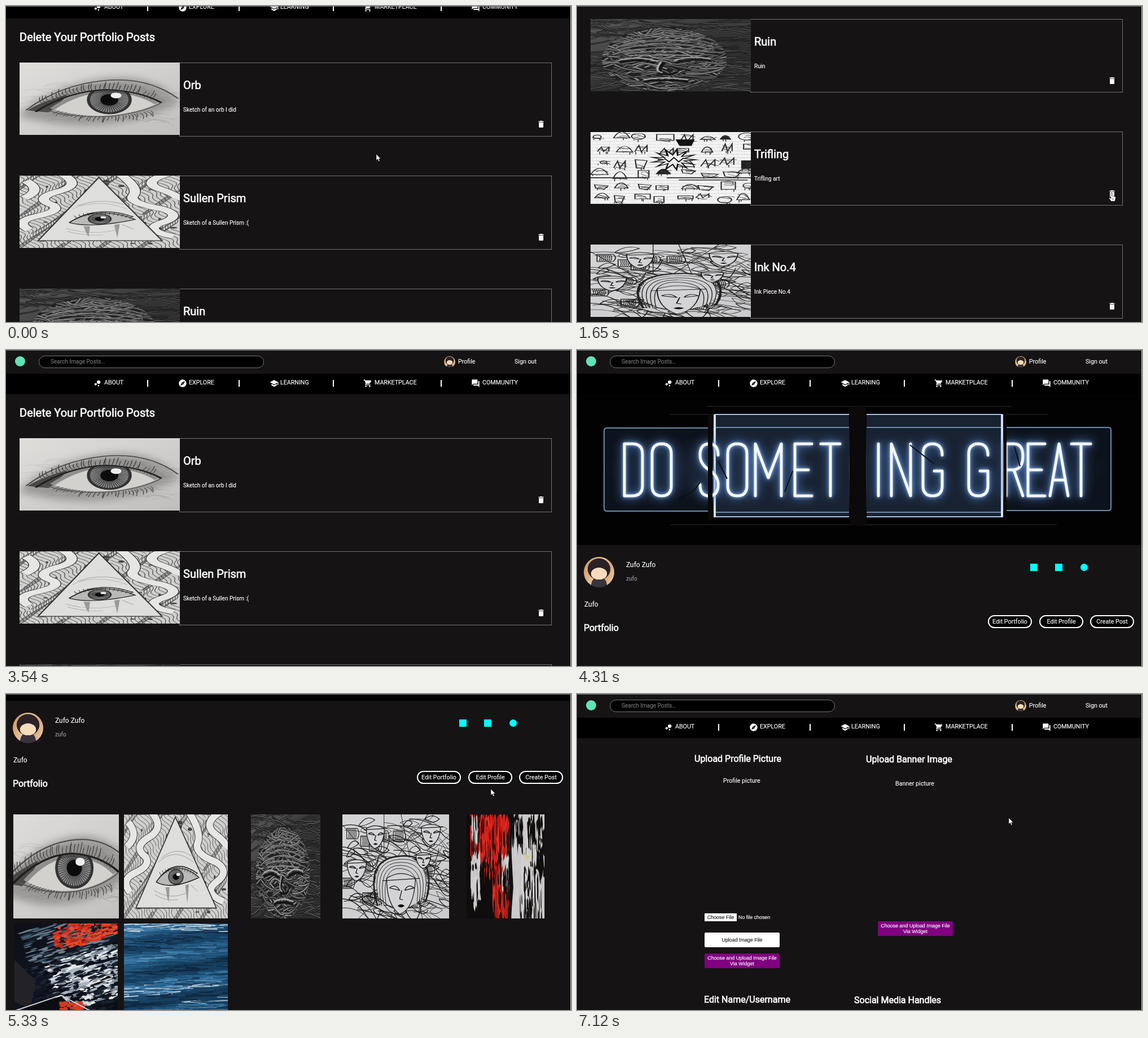
These frames come from a looping animation (1001x559 px, 8 s). An HTML page with a canvas:

```html
<!DOCTYPE html>
<html lang="en">
<head>
<meta charset="utf-8">
<title>Portfolio</title>
<style>
html, body { margin: 0; width: 100%; height: 100%; overflow: hidden; background: #151314; }
body { position: relative; font: 10.67px/20px Roboto, sans-serif; color: #fff; -webkit-text-stroke: .15px; }
body *, #frame { position: absolute; white-space: nowrap; }
svg { overflow: visible; }
svg * { position: static; }
#page, section { left: 0; top: 0; width: 1001px; height: 1400px; }
#page, section, #rest, #wall, #hero, #bio, #gallery, #cursor, #arrow, #hand {
  animation: 8s step-end -1ms infinite;
}
#frame { inset: 0; box-sizing: border-box; border: solid #777; border-width: 1px 1px 0 0; border-right-color: #ccc; }

#nav { top: 42px; width: 1001px; height: 36px; background: #000; }
#nav svg { top: 9px; width: 16px; height: 16px; fill: #fff; }
#nav span { top: 6px; }
#nav i { top: 11px; width: 2px; height: 12px; background: #fff; }
#search { left: 58px; top: 10px; width: 377px; height: 20px; padding-left: 20px; border: 1px solid #777;
  border-radius: 11px; background: #000; color: #757575; font-size: 10px; }
.dot { border-radius: 50%; }
.face { border-radius: 50%; background:
  radial-gradient(27% 20% at 50% 55%, #f6dcbb 96%, transparent),
  radial-gradient(38% 36% at 50% 40%, #2b2226 96%, transparent),
  radial-gradient(26% 28% at 50% 92%, #38343c 96%, transparent),
  linear-gradient(115deg, #c98f5d, #e9c49c 45%, #d9a77a 70%, #f0d6b8); }

h1, h2 { margin: 0; font-weight: 400; -webkit-text-stroke: .65px #fff; }
h1 { font-size: 20px; }
h2 { font-size: 16px; }

.card { left: 24px; width: 943px; height: 130.67px; }
.card div { left: 283px; width: 660px; height: 130.67px; box-sizing: border-box; border: 1px solid #747474; }
.card canvas { width: 284px; height: 128px; }
.card h1 { left: 290px; top: 30px; }
.card p { left: 290px; top: 74px; margin: 0; font-size: 10px; }
.card svg { left: 916px; top: 101px; width: 16px; height: 16px; fill: #fff; }

.pill { top: 469px; width: 74px; height: 19px; border: 2px solid #fff; border-radius: 12px; background: #000; text-align: center; }
.sns { top: 378px; width: 13px; height: 13px; background: #0ff; }
#bio span { font-size: 12px; }

.btn, .file { font: 8.89px/10px "Liberation Sans", Arial, sans-serif; text-align: center; }
.btn { width: 133px; border-radius: 2px; padding: 3px 0; height: 20px; background: #800080; }
.plain { background: #fff; color: #222; line-height: 20px; }

@keyframes scroll {
  0% { top: -56px } 1.5% { top: -190px } 3% { top: -332.67px } 6.125% { top: -360px }
  7.875% { top: -440px } 9.375% { top: -510px } 10.875% { top: -532.67px }
  36.75% { top: -480px } 38.25% { top: -350px } 39.75% { top: -210px } 41.25% { top: -100px } 42.75% { top: -30px }
  44.25% { top: 0 } 60.625% { top: -16px } 62.125% { top: -80px } 63.625% { top: -170px }
  65.125% { top: -270px } 66.625% { top: -333px }
  82.625% { top: -250px } 84.125% { top: -150px } 85.625% { top: -70px } 87.5% { top: -20px }
  89%, 100% { top: 0 }
}
@keyframes point {
  0% { transform: translate(656px, 262px) } 6.125% { transform: translate(667px, 268px) }
  10.875% { transform: translate(681px, 275px) } 12.75% { transform: translate(824px, 313px) }
  14.5% { transform: translate(880px, 322px) } 16% { transform: translate(925px, 330px) }
  17.5% { transform: translate(949px, 333px) } 19.125% { transform: translate(948px, 332px) }
  20.625% { transform: translate(947px, 330px) } 33.75% { transform: translate(800px, 310px) }
  35.25% { transform: translate(598px, 282px) } 42.75% { transform: translate(620px, 90px) }
  44.25% { transform: translate(640px, -40px) } 55.625% { transform: translate(790px, 70px) }
  57.125% { transform: translate(806px, 210px) } 58.75% { transform: translate(813px, 368px) }
  65.125% { transform: translate(845px, 230px) } 66.625% { transform: translate(859px, 168px) }
  68.125% { transform: translate(859px, 148px) } 79.5% { transform: translate(810px, 190px) }
  85.625%, 100% { transform: translate(765px, 219px) }
}
@keyframes arrow { 0%, 33.75%, 65.125%, 73.5% { opacity: 1 } 17.5%, 58.75%, 71.625% { opacity: 0 } 100% { opacity: 1 } }
@keyframes hand { 0%, 33.75%, 65.125%, 73.5% { opacity: 0 } 17.5%, 58.75%, 71.625% { opacity: 1 } 100% { opacity: 0 } }
@keyframes posts { 0% { opacity: 1 } 52.375%, 100% { opacity: 0 } }
@keyframes profile { 0% { opacity: 0 } 52.375% { opacity: 1 } 73.5%, 100% { opacity: 0 } }
@keyframes edit { 0% { opacity: 0 } 73.5%, 100% { opacity: 1 } }
@keyframes load { 0% { opacity: 0 } 53.875%, 100% { opacity: 1 } }
@keyframes images { 0% { opacity: 0 } 55.625%, 100% { opacity: 1 } }
@keyframes remove { 0% { opacity: 1 } 30.25%, 100% { opacity: 0 } }
@keyframes closeup { 0% { top: 199.67px } 30.25%, 100% { top: 0 } }
#page { animation-name: scroll }
#posts { animation-name: posts }
#profile { animation-name: profile }
#edit { animation-name: edit }
#hero, #bio { animation-name: load }
#gallery { animation-name: images }
#wall { animation-name: remove }
#rest { animation-name: closeup }
#list, #wall, #rest { top: 0; }
#cursor { animation-name: point }
#arrow { animation-name: arrow }
#hand { animation-name: hand }
</style>
</head>
<body>
<div id="page">
  <b class="dot" style="left:16px;top:11px;width:18px;height:18px;background:#5fe3b5"></b>
  <div id="search">Search Image Posts...</div>
  <b class="face" style="left:776px;top:11px;width:20px;height:20px"></b>
  <span style="left:801px;top:11px">Profile</span>
  <span style="left:901px;top:11px">Sign out</span>
  <div id="nav"></div>

  <section id="posts">
    <h1 style="left:24px;top:101px">Delete Your Portfolio Posts</h1>
    <div id="list"></div>
    <div id="wall"></div>
    <div id="rest"></div>
  </section>

  <section id="profile">
    <svg id="hero" style="left:0;top:78px" width="1001" height="267" viewBox="0 62 1001 267">
      <defs>
        <radialGradient id="haze"><stop stop-color="#2c3f5c"/><stop offset="1" stop-color="#0d131c"/></radialGradient>
      </defs>
      <path d="M0 62H1001V329H0Z" fill="#020203"/>
      <path d="M48 122H946V268H48Z" fill="url(#haze)"/>
      <path d="M244 98H482V280H244ZM513 98H754V280H513Z" fill="#182231"/>
      <path d="M165 98H835M165 293H850M230 84H770M0 122V235" stroke="#1b1817" stroke-width="2"/>
      <path d="M234 122H52Q48 122 48 127V264Q48 269 53 269H234M760 121H942Q946 121 946 126V263Q946 268 941 268H760M244 121H482M244 271H482M513 121H754M513 271H754" fill="none" stroke="#7089ab" stroke-width="2"/>
      <path d="M244 98H482M244 279H482M513 98H754M513 279H754" stroke="#a9bfdc" stroke-width="2"/>
      <path d="M244 98V280M753 98V280" stroke="#cfe0f7" stroke-width="4"/>
      <g id="neon" fill="none" stroke="#f5f9ff" stroke-width="5" stroke-linecap="round" stroke-linejoin="round"
         style="filter:drop-shadow(0 0 3px #8db4ee) drop-shadow(0 0 9px #4f7fc4)"></g>
      <path d="M232 98H240V285H232ZM756 98H761V285H756ZM483 84H512V295H483Z" fill="#0b0909"/>
      <path d="M250 180L266 212M382 198L368 235M590 152L632 185M775 155L785 190M180 245Q200 245 218 218" stroke="#0a0e15" stroke-width="2" fill="none"/>
    </svg>
    <div id="bio">
      <b class="face" style="left:12px;top:366px;width:54px;height:54px"></b>
      <span style="left:87px;top:370px">Zufo Zufo</span>
      <span style="left:87px;top:395px;font-size:10px;color:#999">zufo</span>
      <span style="left:13px;top:440px">Zufo</span>
    </div>
    <b class="sns" style="left:803px"></b><b class="sns" style="left:847px"></b><b class="sns dot" style="left:892px"></b>
    <h2 style="left:12px;top:482px">Portfolio</h2>
    <div class="pill" style="left:728px">Edit Portfolio</div>
    <div class="pill" style="left:819px">Edit Profile</div>
    <div class="pill" style="left:909px">Create Post</div>
    <div id="gallery"></div>
  </section>

  <section id="edit">
    <h2 style="left:208px;top:105px">Upload Profile Picture</h2>
    <h2 style="left:512px;top:106px">Upload Banner Image</h2>
    <span style="left:259px;top:144px">Profile picture</span>
    <span style="left:564px;top:149px">Banner picture</span>
    <span class="file plain" style="left:226px;top:388px;width:57px;line-height:14px">Choose File</span>
    <span class="file" style="left:286px;top:390px">No file chosen</span>
    <div class="btn plain" style="left:226px;top:422px">Upload Image File</div>
    <div class="btn" style="left:226px;top:459px">Choose and Upload Image File<br>Via Widget</div>
    <div class="btn" style="left:533px;top:402px">Choose and Upload Image File<br>Via Widget</div>
    <h2 style="left:225px;top:531px">Edit Name/Username</h2>
    <h2 style="left:491px;top:532px">Social Media Handles</h2>
  </section>
</div>

<div id="cursor" style="left:0;top:0">
  <svg id="arrow" width="9" height="14"><path d="M0 0V11L2.5 8.8 4.3 13 6.2 12.1 4.4 8.2H7.8Z" fill="#fff" stroke="#000" stroke-width=".5"/></svg>
  <svg id="hand" width="13" height="17"><path d="M-1.2 1Q0 -.8 1.2 1V6L6.8 7.3Q7.6 7.7 7.4 9.5L6 15.5H-.8L-4.3 10.2Q-4.6 8.8-3.2 9L-1.2 10.6Z" fill="#fff" stroke="#000" stroke-width=".6"/><path d="M1.2 10V13M3.2 10V13" stroke="#333" stroke-width=".6"/></svg>
</div>
<div id="frame"></div>

<script>
const $ = id => document.getElementById(id);
const svg = d => `<svg viewBox="0 0 24 24"><path d="${d}"/></svg>`;
const ring = (x, y, r) => `M${x - r} ${y}a${r} ${r} 0 1 1 ${2 * r} 0a${r} ${r} 0 1 1 ${-2 * r} 0z`;

// Navigation: icon x, label x, label, icon path
const items = [
  [154, 174, "ABOUT", ring(7.2, 14.4, 3.2) + ring(14.8, 18, 2) + ring(15.2, 8.8, 4.8)],
  [305, 324, "EXPLORE", "M12 10.9c-.61 0-1.1.49-1.1 1.1s.49 1.1 1.1 1.1 1.1-.49 1.1-1.1-.49-1.1-1.1-1.1zM12 2C6.48 2 2 6.48 2 12s4.48 10 10 10 10-4.48 10-10S17.52 2 12 2zm2.19 12.19L6 18l3.81-8.19L18 6z"],
  [467, 486, "LEARNING", "M5 13.18v4L12 21l7-3.82v-4L12 17zM12 3L1 9l11 6 9-4.91V17h2V9z"],
  [633, 653, "MARKETPLACE", ring(7, 20, 2) + ring(17, 20, 2) + "M1 2v2h2l3.6 7.6L5.2 14C4.5 15.4 5.5 17 7 17h12v-2H7.4l1-1.9h7.5c.7 0 1.4-.4 1.7-1L21.2 5.5Q21.5 4 20 4H5.2l-.9-2z"],
  [824, 844, "COMMUNITY", "M21 6h-2v9H6v2c0 .55.45 1 1 1h11l4 4V7c0-.55-.45-1-1-1zm-4 6V3c0-.55-.45-1-1-1H3c-.55 0-1 .45-1 1v14l4-4h10c.55 0 1-.45 1-1z"]
];
$("nav").innerHTML = items.map(([ix, x, label, d]) =>
  svg(d).replace("<svg", `<svg style="left:${ix}px"`) + `<span style="left:${x}px">${label}</span>`).join("") +
  [250, 412, 579, 770].map(x => `<i style="left:${x}px"></i>`).join("");

// Neon sign
const glyphs = {
  D: "M0 0V92H14Q32 92 32 74V18Q32 0 14 0Z", O: "M0 18Q0 0 17 0T34 18V74Q34 92 17 92T0 74Z",
  S: "M32 20Q32 0 16 0T0 20Q0 36 16 46T32 72Q32 92 16 92T0 72", M: "M0 92V0L23 60 46 0V92",
  E: "M30 0H0V92H30M0 46H24", T: "M0 0H34M17 0V92", I: "M0 0V92", N: "M0 92V0L34 92V0",
  G: "M34 20Q34 0 17 0T0 18V74Q0 92 17 92T34 74V48H20", R: "M0 92V0H14Q30 0 30 22T14 46H0M14 46L30 92",
  A: "M0 92L16 0 32 92M5 64H27"
};
const letterX = [84, 133, 218, 267, 316, 386, 432, 534, 557, 613, 694, 760, 799, 838, 876];
$("neon").innerHTML = [..."DOSOMETINGGREAT"].map((l, i) =>
  `<path transform="translate(${letterX[i]} 150)" d="${glyphs[l]}"/>`).join("");

// Post cards
const bin = svg("M6 19c0 1.1.9 2 2 2h8c1.1 0 2-.9 2-2V7H6zM19 4h-3.5l-1-1h-5l-1 1H5v2h14z");
const card = (slot, art, title, text) => `<div class="card" style="left:24px;width:943px;border:0;top:${156.33 + 199.67 * slot}px"><div></div>
  <canvas width="284" height="128" data-art="${art}"></canvas><h1>${title}</h1><p>${text}</p>${bin}</div>`;
$("list").innerHTML = card(0, "orb", "Orb", "Sketch of an orb I did") +
  card(1, "prism", "Sullen Prism", "Sketch of a Sullen Prism :(") + card(2, "ruin", "Ruin", "Ruin");
$("wall").innerHTML = card(3, "brick", "Trifling", "Trifling art");
$("rest").innerHTML = card(3, "ink", "Ink No.4", "Ink Piece No.4") +
  card(4, "shred", "Tattered Ink No.5", "Tattered Ink No.5");

// Gallery tiles: art, x, y, width
$("gallery").innerHTML = [
  ["orb", 13, 546, 187], ["prism", 209, 546, 184], ["ruin", 434, 546, 123], ["ink", 596, 546, 189],
  ["shred", 816, 546, 138], ["storm", 15, 739, 183], ["sea", 209, 739, 184]
].map(([art, x, y, w]) => `<canvas width="${w}" height="184" data-art="${art}" ${art == "orb" ? "data-crop=23" : ""}
  style="left:${x}px;top:${y}px"></canvas>`).join("");

// Artworks, each on a 200 x 200 field
const rng = seed => () => (seed = seed * 16807 % 2147483647) / 2147483647;
const line = (g, d, color, width = 1) => { g.strokeStyle = color; g.lineWidth = width; g.stroke(new Path2D(d)); };
const fill = (g, d, color) => { g.fillStyle = color; g.fill(new Path2D(d)); };
const oval = (g, x, y, rx, ry, color) => { g.fillStyle = color; g.beginPath(); g.ellipse(x, y, rx, ry, 0, 0, 7); g.fill(); };
const grey = v => `rgb(${v},${v},${v})`;
const back = (g, ...colors) => {
  const s = g.createLinearGradient(0, 0, 200, 200);
  colors.forEach((c, i) => s.addColorStop(i / Math.max(1, colors.length - 1), c));
  g.fillStyle = s;
  g.fillRect(0, 0, 200, 200);
};
const iris = (g, x, y, rx, ry) => {
  oval(g, x, y, rx, ry, "#333");
  oval(g, x, y, rx * .86, ry * .86, "#8a8a8a");
  for (let a = 0; a < 6.28; a += .14) {
    const c = Math.cos(a), s = Math.sin(a);
    line(g, `M${x + c * rx * .4} ${y + s * ry * .4}L${x + c * rx * .92} ${y + s * ry * .92}`, "#383838", rx / 24);
  }
  oval(g, x, y, rx * .4, ry * .4, "#0c0c0c");
  oval(g, x + rx * .3, y - ry * .3, rx * .24, ry * .2, "#eee");
};
// Scatter of jittered slivers over a box
const streaks = (g, r, n, colors, [x, y, w, h], [sw, sh]) => {
  for (let i = 0; i < n; i++) {
    const a = x + r() * w, b = y + r() * h, u = sw * (.3 + r()), v = sh * (.3 + r());
    fill(g, `M${a} ${b}l${u * .6} ${-v * .3}L${a + u} ${b + v * r()}L${a + u * .7} ${b + v}L${a + u * .1} ${b + v * .8}Z`, colors[r() * colors.length | 0]);
  }
};

const arts = {
  orb(g, r) {
    back(g, "#e0dedb", "#d2d0ce", "#c0bebc");
    g.save();
    g.filter = "blur(7px)";
    fill(g, "M0 140Q46 60 106 44T200 108Q160 160 110 172T0 150Z", "#9c9a98");
    g.restore();
    for (let i = 0; i < 90; i++) {
      const x = r() * 190, y = 60 + r() * 110;
      line(g, `M${x} ${y}q14 -9 28 ${-4 + r() * 12}`, "rgba(110,108,106,.12)", 2);
    }
    fill(g, "M12 132Q54 64 106 58T184 110L170 112Q140 74 108 75Q70 78 38 130Z", "#93918f");
    fill(g, "M10 132Q26 110 60 88L46 124 36 138Z", "#4b4948");
    const white = "M38 126Q70 78 108 75Q150 78 174 111Q150 138 115 146Q70 152 38 126Z";
    fill(g, white, "#d3d1ce");
    g.save();
    g.clip(new Path2D(white));
    iris(g, 112, 103, 28, 40);
    line(g, "M38 126Q70 78 108 75Q150 78 174 111", "rgba(40,40,40,.4)", 14);
    g.restore();
    line(g, "M8 132Q50 62 105 50T198 100", "#4b4947", 2);
    line(g, "M20 136Q62 78 108 75Q150 78 177 111", "#1f1d1d", 3.5);
    line(g, "M30 130Q70 156 115 148Q155 138 177 111", "#5a5856", 2);
    for (let x = 34; x < 166; x += 3 + r() * 2) {
      const k = ((x - 106) / 70) ** 2, dx = (x - 110) * .13 + r() * 4 - 2;
      line(g, `M${x} ${76 + k * 40}q${dx} -6 ${dx + 2} ${-12 - r() * 13}`, "#3a3837", .9);
      if (x > 50) line(g, `M${x} ${149 - k * 24}q${dx} 5 ${dx - 2} ${6 + r() * 12}`, "#454341", 1);
    }
  },
  prism(g, r) {
    back(g, "#cfcfcd");
    for (let i = 0; i < 52; i++) {
      let d = `M${i * 4 - 4} 0`;
      for (let y = 0; y <= 200; y += 4) d += `L${i * 4 - 4 + 9 * Math.sin(y / 13 + i * .5) + 4 * Math.sin(y / 5 + i)} ${y}`;
      line(g, d, "#555", 1);
    }
    for (let i = 0; i < 60; i++) oval(g, r() * 200, r() * 200, 1 + r() * 4, 1 + r() * 4, r() < .5 ? "#444" : "#ccc");
    for (const d of ["M52 -5Q80 25 48 44T42 82Q52 98 22 112T12 150", "M125 -5Q150 35 142 55T178 92Q205 110 178 130T192 168", "M185 -5Q150 18 176 38T196 66", "M8 15Q30 40 6 62"]) {
      line(g, d, "#333", 15);
      line(g, d, "#e6e6e4", 13);
    }
    fill(g, "M99 5L178 180H23Z", "#dededc");
    line(g, "M99 5L178 180H23Z", "#333", 1.8);
    line(g, "M66 92Q98 62 134 92M72 84Q100 60 130 80M58 146Q90 166 122 150M60 154Q80 168 104 164M128 135L142 148", "#999", 1);
    fill(g, "M80 140H88L86 170 83 158ZM118 136L125 134 122 172Z", "#9a9a98");
    fill(g, "M62 130Q80 106 104 104Q128 106 143 122Q110 138 92 138Q76 138 62 130Z", "#b9b9b7");
    iris(g, 100, 120, 15, 15);
    line(g, "M62 130Q80 104 104 103Q128 105 145 122M62 130Q90 146 143 122M68 122Q100 82 142 114", "#222", 1.8);
    for (let x = 72; x < 140; x += 5) line(g, `M${x} ${108 + ((x - 104) / 34) ** 2 * 12}l${(x - 104) * .12} -8`, "#444");
  },
  ruin(g, r) {
    back(g, "#5c5c5c", "#343434", "#2a2a2a");
    const strand = (x, y, w, h, v, width) => {
      const d = `M${x} ${y}q${w * (.2 + r() * .5)} ${h * (r() * 2 - 1)} ${w} ${h * (r() * 2 - 1)}`;
      line(g, d, "#181818", width + 2);
      line(g, d, grey(v | 0), width);
    };
    for (let i = 0; i < 230; i++) strand(r() * 240 - 40, r() * 200, 60, 24, 45 + r() * 55, 2);
    oval(g, 92, 112, 78, 90, "#222");
    g.save();
    g.beginPath(); g.ellipse(92, 112, 78, 88, 0, 0, 7); g.clip();
    for (let i = 0; i < 330; i++) strand(r() * 190 - 30, 20 + r() * 180, 24 + r() * 34, 24, 75 + r() * 75, 3);
    for (let i = 0; i < 7; i++) line(g, `M${24 + i * 4} ${66 + i * 6}Q92 ${12 + i * 14} ${162 - i * 4} ${66 + i * 6}`, grey(100 + i * 6), 2.5);
    line(g, "M36 120Q60 108 80 122M106 122Q126 106 150 116M92 120Q80 150 92 152T108 146M66 174Q92 164 122 174", "#151515", 5);
    line(g, "M36 113Q60 101 84 117M104 116Q124 99 150 110M88 118Q78 146 90 148M66 168Q92 158 122 168", "#a5a5a5", 3);
    g.restore();
  },
  brick(g, r) {
    back(g, "#f3f3f3");
    for (let y = 0; y < 200; y += 9) {
      line(g, `M0 ${y}H200`, "#cfcfcf", 1);
      for (let x = y % 2 * 8; x < 200; x += 16) line(g, `M${x} ${y}v9`, "#ddd", .7);
    }
    line(g, "M0 128H70M95 128H200M110 134H196", "#333", 2.5);
    for (let row = 0; row < 6; row++) for (let col = 0; col < 8; col++) {
      const x = col * 26 + r() * 10, y = row * 34 + r() * 14, w = 12 + r() * 10, h = 8 + r() * 15, k = r() * 5 | 0;
      const d = [`M${x} ${y}h${w}v${h}h${-w}z`, `M${x} ${y + h}q${w / 2} ${-2 * h} ${w} 0z`,
        `M${x} ${y}l${w} 3l${-w * .3} ${h}l${-w * .6} -3z`, ring(x + w / 2, y + h / 2, h / 2), `M${x} ${y + h}l${w * .3} ${-h}l3 ${h}l${w * .4} ${-h}v${h}`][k];
      line(g, d, "#2a2a2a", 1.5);
      if (r() < .1) fill(g, d, "#222");
      for (let j = 0; j < 3; j++)
        line(g, `M${x + w * r() * .4} ${y + h * r()}q${w / 2} ${r() * 14 - 7} ${w * .7} ${r() * 6}M${x + w * r()} ${y + h}v${r() * 8}`, "#3a3a3a", 1.1);
    }
    let star = "M";
    for (let i = 0; i < 26; i++) {
      const q = i % 2 ? 13 : 28;
      star += `${104 + q * Math.cos(i * .2417)} ${78 + q * Math.sin(i * .2417)}${i < 25 ? "L" : "Z"}`;
    }
    fill(g, star, "#f3f3f3");
    line(g, star + "M92 74L98 84 104 72 110 84 116 73", "#111", 1.8);
    fill(g, "M106 22H130L126 40H111Z", "#111");
  },
  ink(g, r) {
    back(g, "#d4d4d6", "#cbcbcd");
    for (let i = 0; i < 60; i++) {
      const x = r() * 200, y = r() * 200, u = 12 + r() * 26, v = r() * 30 - 15;
      line(g, `M${x} ${y}q${u / 2} ${v - 12} ${u} ${v}q${-u / 2} 12 ${-u} ${-v}M${x - 30} ${y}q40 ${v} 60 ${u}t30 ${v}`, "#1a1a1a", .7 + r() * .8);
    }
    for (let i = 0; i < 13; i++) {
      const x = r() * 180, y = r() * 180;
      for (let j = 0; j < 7; j++) line(g, `M${x + j * 2.4} ${y}q4 10 0 20`, "#1a1a1a", .9);
      line(g, `M${x - 2} ${y}h20q6 10 0 20h-20z`, "#1a1a1a", 1.2);
    }
    line(g, "M78 0V80L0 110M0 75L200 90M30 200L200 40M110 0L150 200M0 20L90 130M160 0L90 100M0 140L70 110 200 130", "#222", 1);
    oval(g, 110, 130, 48, 50, "#cfcfd1");
    for (let i = 0; i < 5; i++) line(g, `M${66 + i * 4} 176Q${40 + i * 8} ${84 + i * 4} 110 ${80 + i * 6}T${156 - i * 4} 168`, "#222", i ? 1 : 3);
    // Head: centre, half width, half height
    for (const [x, y, w, h] of [[110, 146, 27, 46], [27, 104, 18, 24], [62, 40, 17, 26], [166, 36, 18, 24], [152, 86, 14, 18]]) {
      const at = (a, b) => `${x + a * w} ${y + b * h} `;
      const face = `M${at(-1, -.5)}Q${at(-1, .6)}${at(-.1, 1)}Q${at(.9, .8)}${at(1, -.5)}Q${at(0, -.9)}${at(-1, -.5)}Z`;
      fill(g, face, "#d3d3d5");
      line(g, face + `M${at(-1.3, -.4)}L${at(1.3, -.5)}`, "#1c1c1c", 1.4);
      line(g, `M${at(-.8, -.1)}Q${at(-.4, -.3)}${at(-.1, 0)}L${at(-.8, -.1)}M${at(.25, 0)}Q${at(.5, -.3)}${at(.9, -.1)}L${at(.25, 0)}M${at(.05, 0)}L${at(-.1, .36)}L${at(.12, .4)}`, "#111", 1.4);
      fill(g, `M${at(-.25, .65)}Q${at(0, .52)}${at(.25, .65)}Q${at(0, .78)}${at(-.25, .65)}Z`, "#111");
    }
  },
  shred(g, r) {
    back(g, "#100d0d");
    const reds = ["#d4211a", "#b91812", "#e0352b"], whites = ["#d2d0d0", "#c6c4c4"], black = ["#100d0d"];
    streaks(g, r, 230, reds, [8, 0, 98, 62], [6, 34]);
    streaks(g, r, 110, reds, [66, 100, 42, 75], [6, 34]);
    streaks(g, r, 50, reds, [30, 60, 70, 60], [4, 24]);
    streaks(g, r, 90, whites, [10, 72, 20, 80], [6, 30]);
    streaks(g, r, 50, whites, [90, 80, 18, 45], [6, 26]);
    streaks(g, r, 35, whites, [12, 5, 16, 40], [5, 20]);
    streaks(g, r, 90, black, [0, 0, 108, 190], [4, 34]);
    g.fillStyle = "#cbc9c9";
    g.fillRect(115, 0, 85, 200);
    streaks(g, r, 60, black, [152, 0, 44, 110], [8, 30]);
    streaks(g, r, 40, black, [116, 0, 30, 50], [6, 26]);
    streaks(g, r, 50, whites, [120, 0, 75, 190], [7, 44]);
    streaks(g, r, 40, black, [135, 90, 60, 105], [4, 34]);
    fill(g, "M110 0L120 0 115 70 120 140 114 200H109Z", "#110f0f");
    fill(g, "M150 76L160 80 155 92Z", "#d9c48a");
  },
  storm(g, r) {
    back(g, "#0c0f18", "#0f1622", "#0a0d15");
    g.save();
    g.rotate(-.3);
    streaks(g, r, 260, ["#24364a", "#4c6072", "#141d2b", "#71808c"], [0, 20, 170, 85], [28, 3]);
    streaks(g, r, 230, ["#dc3a22", "#f0492c", "#b32a1c"], [60, 30, 120, 46], [16, 4]);
    streaks(g, r, 600, ["#d5dade", "#aab4be", "#eceef0", "#7f8b96"], [28, 92, 170, 100], [18, 4]);
    streaks(g, r, 200, ["#0c0f18", "#18222e"], [-30, 90, 210, 130], [20, 5]);
    g.restore();
    fill(g, "M0 70L42 110 30 165 0 150Z", "#222227");
    fill(g, "M0 165L90 140 160 200H0Z", "#0c0d13");
    streaks(g, r, 30, ["#d33a22"], [85, 150, 40, 16], [14, 5]);
    line(g, "M0 168L90 138 155 172", "#d9dde0", 2);
  },
  sea(g, r) {
    back(g, "#2f6796", "#194467", "#123350");
    const tones = ["#0f2940", "#173f61", "#22587f", "#3a78a4", "#5e94ba"];
    for (let i = 0; i < 900; i++) {
      const x = r() * 240 - 50, y = r() * 200;
      const band = .5 + .5 * Math.sin(y / 9 + x / 60);
      const foam = r() > .6 && (y < 16 || y > 118 && y < 152 && band > .3);
      line(g, `M${x} ${y}q${10 + r() * 20} ${r() * 6 - 3} ${30 + r() * 30} ${r() * 8 - 5}`,
        foam ? "#b9ccda" : tones[Math.min(4, (band * .7 + r() * .4) * 4 | 0)], .6 + r() * 2);
    }
  }
};

document.querySelectorAll("canvas").forEach(c => {
  const g = c.getContext("2d"), crop = +c.dataset.crop || 0;
  g.scale(c.width / (200 - 2 * crop), c.height / 200);
  g.translate(-crop, 0);
  arts[c.dataset.art](g, rng(4217));
});
</script>
</body>
</html>
```
